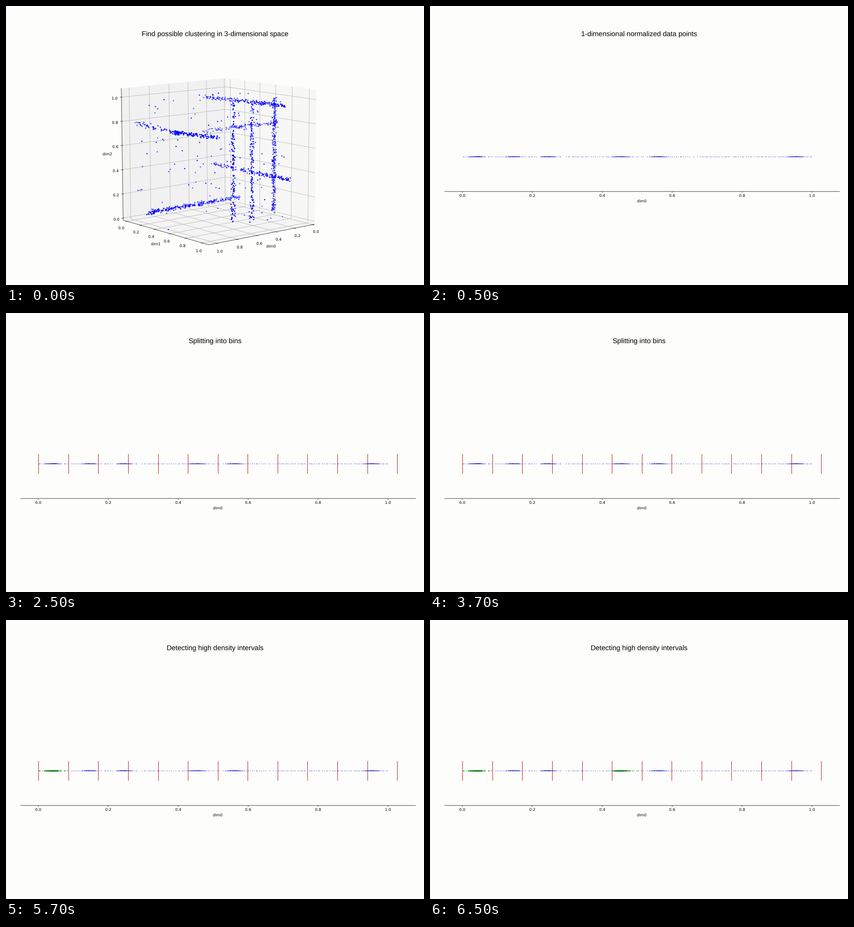
Write an HTML page that moves like this. It is 917x611 px and loops after 8 s.

```html
<!DOCTYPE html>
<html lang="en">
<head>
<meta charset="utf-8">
<title>Clustering steps</title>
<style>
html, body { margin: 0; width: 100%; height: 100%; overflow: hidden; background: #fdfdfc; }
svg { display: block; width: 100vw; height: 100vh; }
text { text-anchor: middle; font: 8.35px "DejaVu Sans", sans-serif; text-rendering: geometricPrecision; }
#title { font: 15.36px "Liberation Sans", Arial, sans-serif; }
</style>
</head>
<body>
<svg id="stage" viewBox="0 0 917 611">
  <g id="space"></g>
  <g id="strip"></g>
  <text id="title" x="458.7" y="65.5"></text>
</svg>
<script>
const $ = id => document.getElementById(id);
const space = $('space'), strip = $('strip'), title = $('title');

function add(parent, tag, attrs) {
  const el = document.createElementNS('http://www.w3.org/2000/svg', tag);
  for (const k in attrs) el.setAttribute(k, attrs[k]);
  parent.appendChild(el);
  return el;
}
const line = (g, a, b, color, width = 0.8) =>
  add(g, 'line', { x1: a[0], y1: a[1], x2: b[0], y2: b[1], stroke: color, 'stroke-width': width });
const label = (g, text, x, y) => { add(g, 'text', { x, y: y + 3 }).textContent = text; };
const dot = (g, x, y, r, fill, opacity = 1) =>
  add(g, 'circle', { cx: x.toFixed(2), cy: y.toFixed(2), r, fill, opacity: opacity.toFixed(2) });
const mix = (a, b, t) => a + (b - a) * t;
const along = (a, b, t) => [mix(a[0], b[0], t), mix(a[1], b[1], t)];

function seeded(s) {
  return () => {
    s = s + 0x6D2B79F5 | 0;
    let t = Math.imul(s ^ s >>> 15, 1 | s);
    t = t + Math.imul(t ^ t >>> 7, 61 | t) ^ t;
    return ((t ^ t >>> 14) >>> 0) / 4294967296;
  };
}
const rand = seeded(11);
// roughly normal, within -2..2
const bell = () => (rand() + rand() + rand() - 1.5) / 0.75;

function drawBox() {
  const leftTop = [253, 180], left = [257, 469], backTop = [483, 158], back = [485, 429];
  const rightTop = [681, 183], right = [677, 478], front = [445, 523];
  const pane = (fill, ...pts) => add(space, 'polygon', { points: pts.join(' '), fill });
  pane('#f1f1f1', leftTop, backTop, back, left);
  pane('#f7f7f6', backTop, rightTop, right, back);
  pane('#f4f4f4', left, back, right, front);

  const grid = '#afafaf', ink = '#111';
  const ticks = [];
  for (let k = 0; k < 6; k++) {
    // dim0 runs along the left wall, dim1 along the right wall
    const t0 = (17 + 45 * k - 0.65 * k * k) / 230;
    const t1 = (9 + 31 * k + 0.75 * k * k) / 198;
    const f0 = along(front, right, t0), f1 = along(left, front, t1);
    const b0 = along(left, back, t0), b1 = along(back, right, t1);
    line(space, along(leftTop, backTop, t0), b0, grid);
    line(space, b0, f0, grid);
    line(space, along(backTop, rightTop, t1), b1, grid);
    line(space, b1, f1, grid);

    const z = [253.3 + 0.73 * k, 199.5 + 53 * k], zb = [483.2 + 0.36 * k, 177 + 49.4 * k];
    line(space, z, zb, grid);
    line(space, zb, [680.7 - 0.73 * k, 205 + 53.4 * k], grid);

    ticks.push([[f0[0] - 2, f0[1] - 0.7], [f0[0] + 3, f0[1] + 1.2]]);
    ticks.push([[f1[0] + 2, f1[1] - 0.5], [f1[0] - 3, f1[1] + 0.7]]);
    ticks.push([[z[0] + 2, z[1] - 0.3], [z[0] - 3.5, z[1] + 0.5]]);

    const down = (1 - k / 5).toFixed(1), up = (k / 5).toFixed(1);
    label(space, down, 469 + 44.2 * k - 0.4 * k * k, 536.5 - 8.5 * k);
    label(space, up, 253 + 32 * k + 0.4 * k * k, 485.8 + 9 * k + 0.2 * k * k);
    label(space, down, 238.3 + 0.8 * k, 202.3 + 53 * k);
  }
  line(space, leftTop, left, ink);
  line(space, left, front, ink);
  line(space, front, right, ink);
  ticks.forEach(t => line(space, t[0], t[1], ink));
  label(space, 'dim0', 581.5, 526);
  label(space, 'dim1', 328.5, 521);
  label(space, 'dim2', 222.3, 324);
}

// scatters points around a segment, fading with depth
function streak(from, to, count, near = 1, far = near) {
  for (let i = 0; i < count; i++) {
    const t = rand(), [x, y] = along(from, to, t);
    dot(space, x + bell() * 3.3, y + bell() * 3.3, 1.35, '#00f', mix(near, far, t));
  }
}

function strays(x0, x1, y0, y1, count) {
  for (let i = 0; i < count; i++)
    dot(space, mix(x0, x1, rand()), mix(y0, y1, rand()), 1.35, '#00f', mix(0.6, 1, rand()));
}

function drawCloud() {
  streak([438, 199], [614, 219], 170, 0.6, 1);
  streak([284, 256], [372, 277], 48, 0.7, 1);
  streak([366, 276], [468, 289], 115);
  streak([373, 278], [379, 278], 32);
  streak([432, 274], [598, 255], 110, 0.55, 0.7);
  streak([453, 345], [622, 381], 150, 0.55, 1);
  streak([306, 454], [512, 418], 270, 1, 0.45);
  streak([499, 208], [499, 476], 135);
  streak([540, 211], [539, 476], 135);
  streak([589, 200], [587, 454], 240, 0.75);
  strays(285, 430, 190, 490, 45);
  strays(430, 615, 190, 470, 75);
}

const binWidth = 65.58;
const dots = [];
let bins;

function drawStrip() {
  line(strip, [31.5, 406.2], [899, 406.2], '#222', 0.9);
  for (let k = 0; k < 6; k++) {
    const x = 71 + 153.4 * k;
    line(strip, [x, 406], [x, 409.3], '#222');
    label(strip, (k / 5).toFixed(1), x, 415);
  }
  label(strip, 'dim0', 464.5, 427);

  const place = x => dots.push({
    el: dot(strip, x, 330.4, 0.7, '#1414d2'),
    bin: Math.floor((x - 71) / binWidth)
  });
  const pile = (center, spread, count) => {
    for (let i = 0; i < count; i++) place(center + bell() * spread);
  };
  for (const center of [103, 184, 259, 419, 501, 802]) pile(center, 11, 140);
  pile(107, 5, 90);
  const gap = 3.4;
  for (let x = 71; x < 836; x += gap)
    if (rand() < 0.85) place(x + rand() * gap);

  bins = add(strip, 'g', { 'shape-rendering': 'crispEdges' });
  for (let k = 0; k <= 12; k++) {
    const x = Math.round(71.2 + binWidth * k) + 0.5;
    line(bins, [x, 309], [x, 352], '#b51212', 1);
  }
}

const steps = [
  { at: 0, text: 'Find possible clustering in 3-dimensional space', cloud: true },
  { at: 500, text: '1-dimensional normalized data points' },
  { at: 2500, text: 'Splitting into bins', bins: true },
  { at: 4500, text: 'Detecting high density intervals', bins: true, found: [0] },
  { at: 6500, text: 'Detecting high density intervals', bins: true, found: [0, 5] }
];
const loop = 8000;
let shown;

function render(ms) {
  const step = steps.filter(s => s.at <= ms).pop();
  if (step === shown) return;
  shown = step;
  title.textContent = step.text;
  space.style.display = step.cloud ? '' : 'none';
  strip.style.display = step.cloud ? 'none' : '';
  bins.style.display = step.bins ? '' : 'none';
  const found = step.found || [];
  for (const { el, bin } of dots) {
    const hit = found.includes(bin);
    el.setAttribute('fill', hit ? '#0a7d0a' : '#1414d2');
    el.setAttribute('r', hit ? 0.9 : 0.7);
  }
}

drawBox();
drawCloud();
drawStrip();
const start = performance.now();
function tick() {
  render((performance.now() - start) % loop);
  requestAnimationFrame(tick);
}
tick();
</script>
</body>
</html>
```
